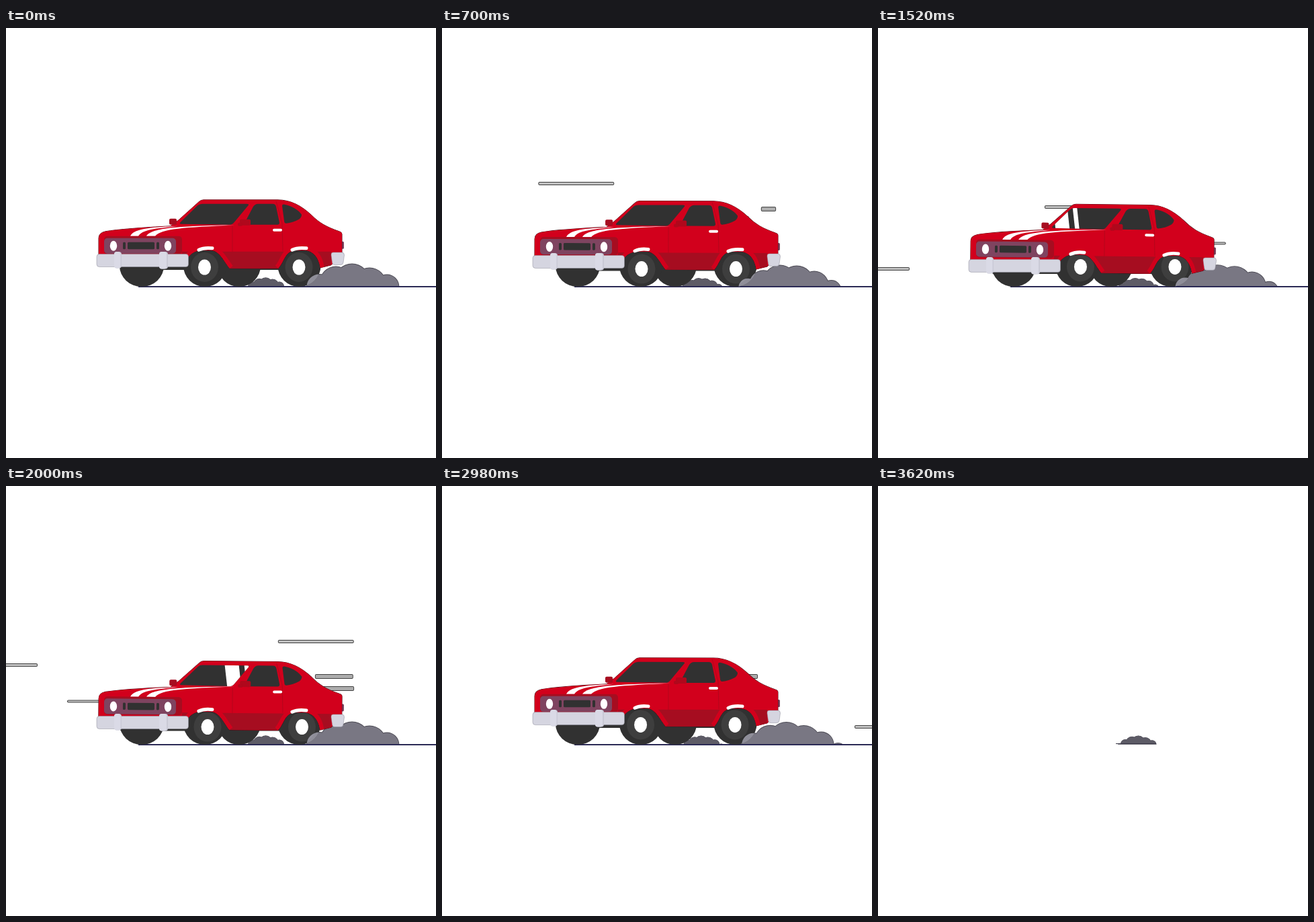
An HTML page with a canvas for the animation above (3640 ms loop, 640 by 640 pixels).

```html
<!DOCTYPE html>
<html lang="en">
<head>
<meta charset="utf-8">
<title>Red car</title>
<style>
html, body { margin: 0; width: 100%; height: 100%; overflow: hidden; background: #fff; }
canvas { display: block; width: 640px; height: 640px; }
</style>
</head>
<body>
<canvas id="stage" width="640" height="640"></canvas>
<script>
const ctx = document.getElementById('stage').getContext('2d');
const LOOP = 3640, STEP = 20, BOB = 600, PUFF = 200, GUST = 1120;
const RED = '#d2001c', DEEP_RED = '#a60d20', DARK = '#313131', PLUM = '#7f4460', CHROME = '#d5d5e0';
const GROUND = 384.5;
const lerp = (a, b, k) => a + (b - a) * k;
const mod = (a, n) => ((a % n) + n) % n;

function fill(path, color) {
  ctx.fillStyle = color;
  ctx.fill(path);
}

function stroke(path, color, width) {
  ctx.strokeStyle = color;
  ctx.lineWidth = width;
  ctx.stroke(path);
}

function box(x1, y1, x2, y2, r, color) {
  const p = new Path2D();
  p.roundRect(x1, y1, x2 - x1, y2 - y1, r);
  fill(p, color);
  return p;
}

function oval(x, y, rx, ry, color) {
  const p = new Path2D();
  p.ellipse(x, y, rx, ry, 0, 0, 7);
  fill(p, color);
}

function within(path, draw) {
  ctx.save();
  ctx.clip(path);
  draw();
  ctx.restore();
}

const shape = {
  arches: new Path2D('M266 358C268 342 276 331 290 330H306C319 332 324 346 333 357M405 357C414 348 414 332 430 330H446C460 332 466 344 468 357'),
  body: new Path2D('M500 334V306Q500 303 496 302C476 295 466 289 455 278C440 264 424 255 404 255H294Q290 255 287 258L257 285L245 294C205 296 165 299 148 302Q138 304 138 312V350H266C268 342 276 331 290 330H306C319 332 324 346 333 357H405C414 348 414 332 430 330H446C460 332 466 344 468 356L484 352Z'),
  windshield: new Path2D('M261 291Q257 291 260 288L285 263.5Q288 261 292 261H358Q363 261 360 264L340 288Q337 292 333 292Z'),
  sideWindow: new Path2D('M359 292Q355 291 358 284L368 265Q371 261 375 261H397Q401 261 402 265L407 289Q407 292 404 292Z'),
  quarterWindow: new Path2D('M411 264Q411 261 415 262C428 265 436 271 440 277Q440 281 436 284Q427 289 417 290Q414 290 414 286Z'),
  stripes: new Path2D('M185 309C190 299 208 296 256 294C222 298 203 299 197 309ZM209 309C215 299 240 294 340 292.5C265 296 231 298 222 309Z'),
  seams: new Path2D('M337 294V333M402 257L411 290L412 331'),
  shine: new Path2D('M287 329.5Q295 325.5 307 327M426 329.5Q434 325.5 447 327')
};

// Stations a puff passes: x, y, radius, one per PUFF period.
const puffRoute = [
  [444, 388, 2], [466, 385, 18.5], [491, 379, 24], [515, 377, 26],
  [541, 382, 25], [567, 385, 18], [592, 395, 11]
];

function puffs(t, grow) {
  const path = new Path2D();
  const k = mod(t, PUFF) / PUFF;
  for (let i = 0; i < puffRoute.length - 1; i++) {
    const from = puffRoute[i], to = puffRoute[i + 1];
    const early = i === 0 ? Math.sqrt(k) : k;
    const x = lerp(from[0], to[0], k);
    const y = lerp(from[1], to[1], k);
    const r = lerp(from[2], to[2], early) + grow;
    path.moveTo(x + r, y);
    path.arc(x, y, r, 0, 7);
  }
  return path;
}

function smoke(t, color) {
  ctx.save();
  ctx.beginPath();
  ctx.rect(0, 0, 640, GROUND);
  ctx.clip();
  fill(puffs(t, .4), '#4b4953');
  fill(puffs(t, -.5), color);
  ctx.restore();
}

function smallSmoke(t) {
  ctx.save();
  ctx.translate(360, GROUND);
  ctx.scale(.39, .39);
  ctx.translate(-447, -GROUND);
  smoke(t, '#5d5b66');
  ctx.restore();
}

function streak(x1, x2, y, h) {
  if (x2 - x1 < 2) return;
  box(x1, y - h / 2, x2, y + h / 2, 2, '#414141');
  box(x1 + 1, y - h / 2 + 1, x2 - 1, y + h / 2 - 1, 1, h > 5 ? '#adadad' : '#c2c2c2');
}

function wind(t) {
  const phase = mod(t, BOB), length = 113, speed = 2.615;
  [[231, 2, 5], [320, 122, 4], [266, 182, 5], [358, 302, 5]].forEach(([y, enter, h]) => {
    const x = speed * mod(phase - enter, BOB) - length;
    if (x < 640) streak(x, x + length, y + .5, h);
  });
  const gust = mod(t, GUST);
  [[269, 437, 520, 138], [283, 450, 680, 189], [301, 470, 736, 189]].forEach(([y, x, start, hold]) => {
    const age = gust - start;
    if (age > 0) streak(x + .9 * Math.max(0, age - hold), x + .334 * age, y + .5, 7);
  });
}

function wheel(x, turn) {
  const hubX = x - 3 * Math.cos(turn), hubY = 356 + 3 * Math.sin(turn);
  oval(x - 2.5, 354, 32, 31, DARK);
  oval(hubX, hubY, 20.5, 22, '#3e3e3e');
  oval(hubX, hubY, 9.5, 11.5, '#fff');
}

function reflection(t) {
  const x = 325 + .1354 * (t - 2000);
  within(shape.windshield, () => {
    const band = (left, width) =>
      fill(new Path2D(`M${left} 260h${width}l4 33h${-width}z`), '#fff');
    band(x, 21);
    band(x + 29, 6.5);
  });
}

function body(t, lift) {
  ctx.save();
  ctx.translate(138, 320.8 + 4.6 * lift);
  ctx.rotate(.0115 * lift);
  ctx.translate(-138, -320);
  box(499, 317, 503, 328, 1.5, PLUM);
  stroke(shape.body, '#4a0710', 1);
  fill(shape.body, RED);
  within(shape.body, () => {
    box(262, 332, 484, 360, 0, DEEP_RED);
    stroke(shape.arches, RED, 12);
  });
  fill(shape.windshield, DARK);
  reflection(t);
  fill(shape.sideWindow, DARK);
  fill(shape.quarterWindow, DARK);
  stroke(shape.seams, '#b4061c', 1);
  fill(shape.stripes, '#fff');
  ctx.lineCap = 'round';
  stroke(shape.shine, '#fff', 5);
  box(397, 298, 411, 302, 2, '#fff');
  box(348, 284, 364, 293, 2, '#b0081c');
  box(345, 289, 352, 294, 2, '#b0081c');
  box(243, 283, 254, 292, 2, DEEP_RED);
  box(146, 309, 262, 336, 5, DEEP_RED);
  box(146, 312, 253, 335, 5, PLUM);
  oval(160, 323.5, 5.2, 7.5, '#fff');
  oval(241, 323.5, 5.2, 7.5, '#fff');
  box(174, 318, 178, 328.5, 1.5, DARK);
  box(181, 318, 221, 328.5, 1.5, DARK);
  box(224, 318, 228, 328.5, 1.5, DARK);
  ctx.restore();
}

function bumpers(lift) {
  ctx.save();
  ctx.translate(0, 8 * lift);
  const front = box(135, 336.5, 271.5, 355.5, 4, CHROME);
  stroke(front, '#8d8d98', .5);
  box(161, 333, 172, 357.5, 4, '#c9c9d6');
  box(161, 333, 170.5, 357.5, 4, '#dadae6');
  box(228, 333, 241, 358.5, 4, '#c9c9d6');
  box(228, 333, 239, 358.5, 4, '#dadae6');
  const rear = new Path2D('M487 334H500Q503.5 334 503.5 338L502 349Q501.5 352.5 498 352.5H489Q486 352.5 485.5 349L484 338Q483.5 334 487 334Z');
  fill(rear, CHROME);
  stroke(rear, '#8d8d98', .5);
  ctx.restore();
}

function underbody(lift) {
  ctx.save();
  ctx.translate(0, 6 * lift);
  box(170, 345, 268, 360, 2, DARK);
  box(325, 345, 412, 360, 2, DARK);
  ctx.restore();
}

function scene(t) {
  ctx.fillStyle = '#fff';
  ctx.fillRect(0, 0, 640, 640);
  if (t >= LOOP - STEP) {
    smallSmoke(t);
    box(354, 383, 414, 384, 0, '#3b3948');
    return;
  }
  const turn = 2 * Math.PI * t / BOB;
  const lift = (1 - Math.cos(turn)) / 2;
  wind(t);
  smallSmoke(t);
  smoke(t, '#797783');
  box(197, 384, 640, 386, 0, '#2b2a55');
  underbody(lift);
  oval(202, 354, 33, 31, DARK);
  oval(347, 354, 32, 31, DARK);
  wheel(298.5, turn);
  wheel(439, turn);
  const tyre = new Path2D();
  tyre.ellipse(436.5, 354, 32, 31, 0, 0, 7);
  within(tyre, () => fill(puffs(t, 0), 'rgba(220,218,238,.55)'));
  body(t, lift);
  bumpers(lift);
}

function frame(now) {
  const t = now % LOOP;
  scene(Math.floor(t / STEP) * STEP);
  requestAnimationFrame(frame);
}
scene(0);
requestAnimationFrame(frame);
</script>
</body>
</html>
```
